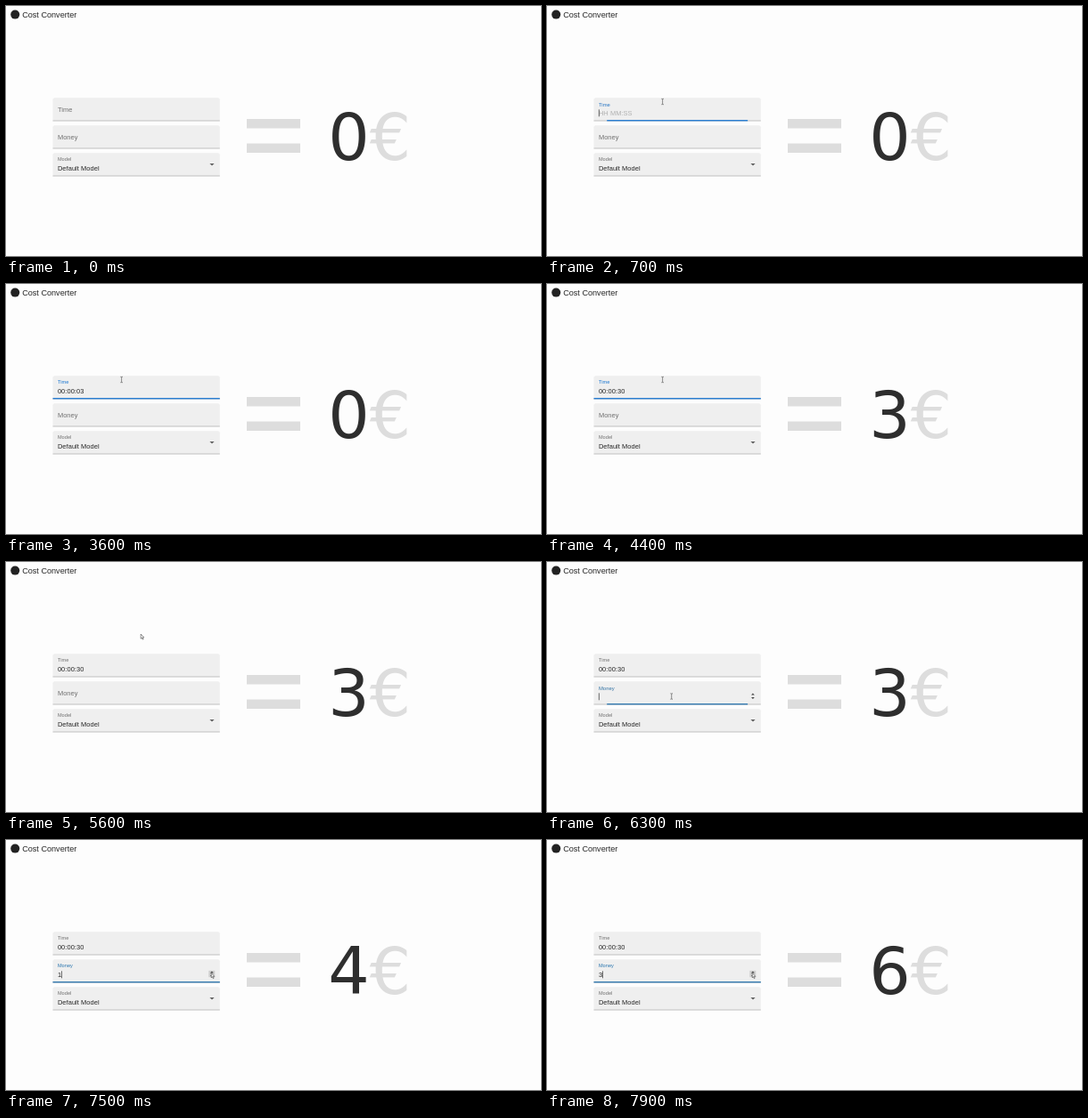
Animation of 600 by 281 pixels, one loop 8000 ms. Source, as an HTML page:

```html
<!DOCTYPE html>
<html lang="en">
<head>
<meta charset="utf-8">
<title>Cost Converter</title>
<style>
  html, body { margin: 0; width: 100%; height: 100%; overflow: hidden; background: #fdfdfd; }
  svg { display: block; width: 100%; height: 100%; }
  text { font-family: "Liberation Sans", Arial, sans-serif; font-size: 7.44px; letter-spacing: .07px; fill: #262626; white-space: pre; }
  .title { font-size: 9.1px; letter-spacing: 0; }
  .big { font-family: "DejaVu Sans", sans-serif; font-size: 73px; letter-spacing: 0; fill: #2e2e2e; }
  .pale { fill: #ddd; }
</style>
</head>
<body>
<svg id="stage" viewBox="0 0 600 281">
  <circle cx="10.2" cy="9.6" r="5" fill="#222"/>
  <text class="title" x="18.2" y="12.8">Cost Converter</text>
  <path class="pale" d="M270 127h60v10.5h-60zM270 154.5h60v10.5h-60z"/>
  <text class="big" x="361.2" y="173"><tspan id="sum">0</tspan><tspan class="pale">€</tspan></text>
  <g id="fields"></g>
  <path d="M228.4 177h5.2l-2.6 2.6z" fill="#606060"/>
  <g id="spin">
    <rect id="spinBox" x="227.3" y="146.8" width="7" height="7.4" fill="#cfcfcf"/>
    <path d="M229 149.4l1.9-2 1.9 2zM229 152l1.9 2 1.9-2z" fill="#444"/>
  </g>
  <path id="beam" d="M-1.3-3.2h1l.3.3.3-.3h1M0-2.9v5.8M-1.3 3.2h1l.3-.3.3.3h1" fill="none" stroke="#444" stroke-width=".6"/>
  <path id="arrow" d="M0 0v5.2l1.2-1.1.9 2 .8-.4-.9-1.9h1.6z" fill="#fff" stroke="#333" stroke-width=".55"/>
</svg>
<script>
const LOOP = 8000;
const FADE = 200;
const LEFT = 52.5, WIDTH = 187.3, TEXT_X = 57.9;
const $ = id => document.getElementById(id);

function add(parent, tag, attrs, content = "") {
  const el = document.createElementNS("http://www.w3.org/2000/svg", tag);
  set(el, attrs);
  el.textContent = content;
  return parent.appendChild(el);
}
function set(el, attrs) {
  for (const k in attrs) el.setAttribute(k, attrs[k]);
}
const show = (el, on) => set(el, { visibility: on ? "visible" : "hidden" });
const mix = (a, b, p) => a + (b - a) * p;
const clamp = p => Math.max(0, Math.min(1, p));

// cubic-bezier(0, 0, .2, 1)
function easeOut(p) {
  let lo = 0, hi = 1;
  for (let i = 0; i < 20; i++) {
    const s = (lo + hi) / 2;
    if (.6 * s * s * (1 - s) + s ** 3 < p) lo = s; else hi = s;
  }
  return 3 * lo * lo - 2 * lo ** 3;
}
const ramp = (t, start) => easeOut(clamp((t - start) / FADE));

// Value of the last step that has begun
const stepAt = (steps, t) => steps.reduce((v, [at, next]) => t >= at ? next : v, steps[0][1]);

function makeField(top, label, color) {
  const g = add($("fields"), "g", {});
  add(g, "path", { d: `M${LEFT} ${top + 26}v-24q0-2 2-2h${WIDTH - 4}q2 0 2 2v24z`, fill: "#efefef" });
  add(g, "rect", { x: LEFT, y: top + 25.4, width: WIDTH, height: .6, fill: "#a0a0a0" });
  return {
    top, color,
    line: add(g, "rect", { y: top + 24.8, height: 1.3, fill: color }),
    label: add(g, "text", {}, label),
    hint: add(g, "text", { x: TEXT_X, y: top + 19.2 }),
    value: add(g, "text", { x: TEXT_X, y: top + 19.2 }),
    caret: add(g, "rect", { y: top + 13, width: .7, height: 8, fill: "#333" })
  };
}

function drawField(f, { raised, focus, value = "", caretX = TEXT_X, caret = false }) {
  const w = WIDTH * focus.width;
  set(f.line, { x: LEFT + (WIDTH - w) / 2, width: w });
  set(f.label, {
    transform: `translate(${TEXT_X} ${mix(f.top + 15.2, f.top + 8.9, raised)}) scale(${mix(1, .75, raised)})`
  });
  f.label.style.fill = `color-mix(in srgb, ${f.color} ${focus.tint * 100}%, #707070)`;
  f.value.textContent = value;
  set(f.caret, { x: caretX });
  show(f.caret, caret);
}

const time = makeField(103.3, "Time", "#1976d2");
const money = makeField(134.3, "Money", "#2874ae");
const model = makeField(165.3, "Model", "#1976d2");
time.hint.textContent = "HH MM:SS";
time.hint.style.fill = "#a4a4a4";

const focusAt = p => ({ width: p, tint: p });
drawField(model, { raised: 1, focus: focusAt(0), value: "Default Model" });

const timeText = [[0, ""], [2900, "00:00:03"], [3900, "00:00:30"]];
const moneyText = [[0, ""], [7500, "1"], [7700, "2"], [7900, "3"]];
const sums = [[0, 0], [3900, 3], [7500, 4], [7700, 5], [7900, 6]];
const timeCaret = [[0, false], [700, true], [1200, false], [1700, true], [2200, false],
  [2800, true], [3600, false], [3900, true], [4400, false], [4900, true], [5400, false]];
const moneyCaret = [[0, false], [6200, true], [6700, false], [7200, true]];
const pointer = [[0, 129.6, 107.5], [4850, 129.6, 107.5], [5100, 151.2, 81], [5650, 151.2, 81],
  [6000, 139.7, 151], [6400, 139.7, 151], [7000, 228.6, 149], [7300, 230.2, 149.6], [LOOP, 230.2, 149.6]];

function pointerAt(t) {
  const i = pointer.findIndex(k => k[0] > t);
  const [t0, x0, y0] = pointer[i - 1], [t1, x1, y1] = pointer[i];
  const p = (t - t0) / (t1 - t0), s = p * p * (3 - 2 * p);
  return [mix(x0, x1, s), mix(y0, y1, s)];
}

function draw(t) {
  const timeIn = ramp(t, 600), timeOn = timeIn * (1 - ramp(t, 5400));
  const typed = stepAt(timeText, t);
  drawField(time, {
    raised: timeIn, focus: focusAt(timeOn), value: typed,
    caretX: typed ? 87.7 : TEXT_X, caret: stepAt(timeCaret, t)
  });
  set(time.hint, { opacity: typed ? 0 : timeIn });

  const moneyOn = ramp(t, 6200), amount = stepAt(moneyText, t);
  drawField(money, {
    raised: moneyOn, focus: focusAt(moneyOn), value: amount,
    caretX: amount ? 62.1 : TEXT_X, caret: stepAt(moneyCaret, t)
  });
  $("sum").textContent = stepAt(sums, t);

  const [x, y] = pointerAt(t);
  const overSpin = x > 227;
  const overInput = !overSpin && (y > 103.3 && y < 129.3 || y > 134.3 && y < 160.3);
  for (const id of ["beam", "arrow"]) set($(id), { transform: `translate(${x} ${y})` });
  show($("beam"), t >= 400 && overInput);
  show($("arrow"), t >= 400 && !overInput);
  show($("spin"), t > 5400 && y > 134.3);
  show($("spinBox"), overSpin);
}

const began = performance.now();
function tick() {
  draw((performance.now() - began) % LOOP);
  requestAnimationFrame(tick);
}
tick();
</script>
</body>
</html>
```
